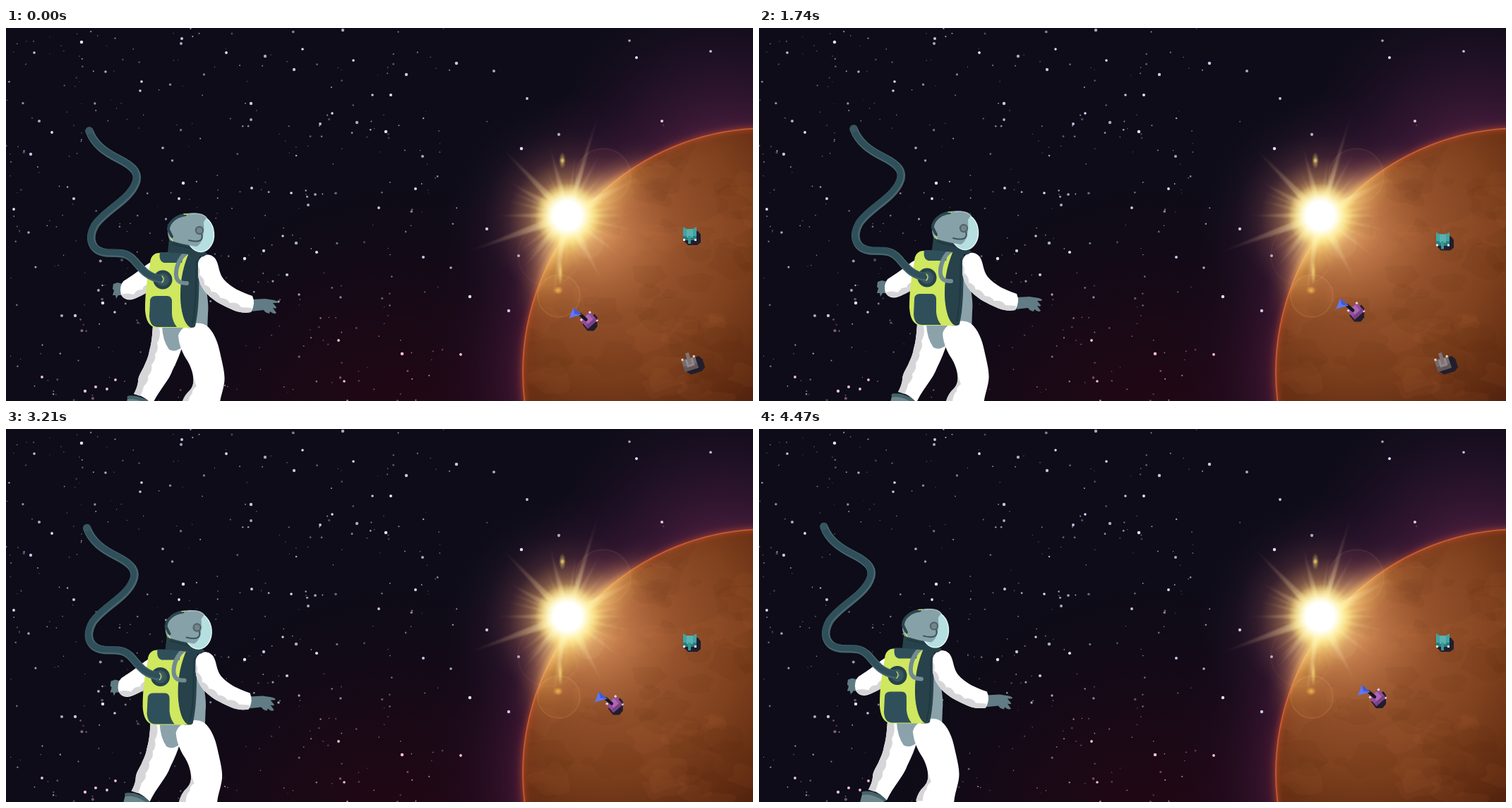
An HTML page with a canvas that plays this animation: 1058x529 px, repeating every 4500 ms.

```html
<!DOCTYPE html>
<html lang="en">
<head>
<meta charset="utf-8">
<title>Astronaut in orbit</title>
<style>
html, body { margin: 0; width: 100%; height: 100%; overflow: hidden; background: #0d0c18; }
canvas { display: block; width: 100%; height: 100%; }
</style>
</head>
<body>
<canvas id="stage" width="1058" height="529"></canvas>
<script>
const W = 1058, H = 529, LOOP = 4500, TAU = Math.PI * 2;
const stage = document.getElementById('stage').getContext('2d');
const backdrop = document.createElement('canvas');
backdrop.width = W;
backdrop.height = H;
let g = backdrop.getContext('2d');

const SUN = { x: 795, y: 266 };
const PLANET = { x: 1078, y: 488, r: 346 };

// Bright stars, x and y in turn
const STARS = [
  312,35, 249,15, 248,22, 192,76, 190,89, 141,62, 107,20, 40,35, 47,132, 538,147,
  347,107, 347,130, 492,46, 567,66, 590,182, 580,228, 591,325, 630,340, 644,463, 638,50,
  691,61, 893,42, 998,33, 883,18, 929,132, 738,100, 783,151, 730,171, 681,285, 726,323,
  657,381, 712,401, 438,236, 404,234, 348,227, 428,251, 245,242, 96,242, 32,290, 11,257,
  398,350, 386,388, 338,327, 365,316, 131,372, 137,390, 154,403, 51,495, 112,515, 127,509,
  143,512, 155,499, 98,408, 79,408, 471,443, 561,462, 479,501, 545,95, 519,95, 497,134,
  462,121, 445,136, 477,3, 420,30, 408,59, 367,40, 65,148, 35,179, 222,170, 251,220,
  392,295, 411,305, 440,318, 528,255
];

function seeded(seed) {
  return () => {
    seed = (seed * 1664525 + 1013904223) >>> 0;
    return seed / 4294967296;
  };
}

const clamp = v => Math.max(0, Math.min(1, v));

function fill(d, color) {
  g.fillStyle = color;
  g.fill(new Path2D(d));
}

function line(d, color, width) {
  g.strokeStyle = color;
  g.lineWidth = width;
  g.lineCap = g.lineJoin = 'round';
  g.stroke(new Path2D(d));
}

function disc(x, y, r, color) {
  g.fillStyle = color;
  g.beginPath();
  g.arc(x, y, r, 0, TAU);
  g.fill();
}

function ring(x, y, r, color, width) {
  g.strokeStyle = color;
  g.lineWidth = width;
  g.beginPath();
  g.arc(x, y, r, 0, TAU);
  g.stroke();
}

// Stops are position and colour in turn
function radial(x, y, r0, r1, ...stops) {
  const grad = g.createRadialGradient(x, y, r0, x, y, r1);
  for (let i = 0; i < stops.length; i += 2) grad.addColorStop(stops[i], stops[i + 1]);
  return grad;
}

function glow(...args) {
  g.fillStyle = radial(...args);
  g.fillRect(0, 0, W, H);
}

function drawSky() {
  g.fillStyle = '#0d0c18';
  g.fillRect(0, 0, W, H);
  glow(560, 610, 0, 400, 0, 'rgba(56,3,18,.62)', .5, 'rgba(44,4,18,.4)', 1, 'rgba(30,4,18,0)');
  glow(PLANET.x, PLANET.y, 340, 490, 0, 'rgba(100,36,62,.7)', .2, 'rgba(72,26,60,.5)',
    .55, 'rgba(46,17,45,.28)', 1, 'rgba(30,12,32,0)');
  glow(1000, 160, 0, 250, 0, 'rgba(78,32,66,.55)', .45, 'rgba(60,25,58,.35)', 1, 'rgba(30,12,32,0)');
  glow(SUN.x, SUN.y, 0, 175, 0, 'rgba(110,66,66,.55)', .5, 'rgba(70,38,62,.32)', 1, 'rgba(40,18,45,0)');
}

function drawStars() {
  const rnd = seeded(71);
  for (let i = 0; i < 380; i++) {
    const x = rnd() * (i % 9 ? 620 : W), y = rnd() * H;
    const r = .6 + rnd() * rnd() * 1.5;
    const tint = y > 400 ? '225,165,190' : '200,196,228';
    disc(x, y, r, `rgba(${tint},${.25 + rnd() * .6})`);
  }
  for (let i = 0; i < STARS.length; i += 2) {
    const x = STARS[i], y = STARS[i + 1];
    const color = y > 430 || x === 929 ? '#f3bed0' : ['#e3dfff', '#c9c4ea', '#aaa8be'][i / 2 % 3];
    disc(x, y, 1.7 + rnd() * .6, color);
  }
}

function blotch(x, y, size, color, rnd) {
  const n = 13, pts = [];
  for (let i = 0; i < n; i++) {
    const a = i / n * TAU, r = size * (.5 + rnd() * .7);
    pts.push([x + Math.cos(a) * r * 1.3, y + Math.sin(a) * r * .8]);
  }
  g.fillStyle = color;
  g.beginPath();
  for (let i = 0; i <= n; i++) {
    const [ax, ay] = pts[i % n], [bx, by] = pts[(i + 1) % n];
    g.quadraticCurveTo(ax, ay, (ax + bx) / 2, (ay + by) / 2);
  }
  g.fill();
}

function drawPlanet() {
  const { x, y, r } = PLANET, rnd = seeded(19);
  g.save();
  g.beginPath();
  g.arc(x, y, r, 0, TAU);
  g.shadowColor = '#b84a2c';
  g.shadowBlur = 12;
  g.fillStyle = '#7c3f1c';
  g.fill();
  g.shadowBlur = 0;
  g.clip();
  glow(850, 290, 0, 350, 0, '#b0653d', .3, '#94512b', .55, '#7f411e', .8, '#602b11', 1, '#43190c');
  for (let i = 0; i < 85; i++) {
    const color = i % 3 ? 'rgba(72,28,10,.07)' : 'rgba(205,130,85,.055)';
    blotch(735 + rnd() * 330, 150 + rnd() * 380, 8 + rnd() * 28, color, rnd);
  }
  glow(x, y, r - 30, r, 0, 'rgba(110,38,20,0)', .7, 'rgba(125,45,22,.15)', 1, 'rgba(195,75,35,.45)');
  g.restore();
  ring(x, y, r, 'rgba(222,104,58,.7)', 1.8);
}

function ray(angle, length, width, alpha) {
  g.save();
  g.translate(SUN.x, SUN.y);
  g.rotate(angle * Math.PI / 180);
  const grad = g.createLinearGradient(0, 0, length, 0);
  grad.addColorStop(0, `rgba(255,235,150,${alpha})`);
  grad.addColorStop(.5, `rgba(245,205,130,${alpha * .45})`);
  grad.addColorStop(1, 'rgba(220,170,140,0)');
  g.fillStyle = grad;
  g.beginPath();
  g.moveTo(0, -width);
  g.lineTo(length, 0);
  g.lineTo(0, width);
  g.fill();
  g.restore();
}

function flare(x, y, rx, ry, color, alpha = .8) {
  g.save();
  g.translate(x, y);
  g.scale(rx, ry);
  g.fillStyle = radial(0, 0, 0, 1, 0, `rgba(${color},${alpha})`, 1, `rgba(${color},0)`);
  g.fillRect(-1, -1, 2, 2);
  g.restore();
}

// Sunlight spilling along the rim of the planet
function drawLimbLight() {
  const light = (color, reach) => radial(SUN.x, SUN.y, 0, reach,
    0, `rgba(${color},.85)`, .45, `rgba(${color},.5)`, 1, `rgba(${color},0)`);
  g.save();
  g.filter = 'blur(11px)';
  ring(PLANET.x, PLANET.y, PLANET.r - 4, light('235,150,50', 150), 42);
  g.filter = 'blur(4px)';
  ring(PLANET.x, PLANET.y, PLANET.r, light('255,190,80', 125), 9);
  g.restore();
}

function drawSun() {
  const rnd = seeded(8);
  g.save();
  g.globalCompositeOperation = 'screen';
  drawLimbLight();
  flare(826, 296, 125, 115, '205,125,65', .35);
  glow(SUN.x, SUN.y, 0, 120, 0, 'rgba(255,225,95,.95)', .28, 'rgba(255,205,75,.75)',
    .45, 'rgba(225,155,65,.36)', .7, 'rgba(150,85,50,.13)', 1, 'rgba(100,50,40,0)');
  const rays = [[-73, 152, 5], [-134, 136, 6], [160, 152, 7], [180, 104, 5], [0, 92, 5], [-28, 115, 8],
    [-150, 98, 6], [-104, 105, 5], [100, 125, 6], [62, 110, 6], [130, 100, 6]];
  g.filter = 'blur(1.2px)';
  for (const [angle, length, width] of rays) ray(angle, length, width, .55);
  for (let i = 0; i < 34; i++) ray(i * 10.6 + rnd() * 7, 55 + rnd() * 52, 4, .38);
  g.filter = 'none';
  flare(788, 188, 5, 12, '190,180,60');
  flare(788, 188, 4, 4, '255,150,50');
  flare(785, 346, 4, 18, '220,190,70');
  flare(782, 372, 7, 6, '255,165,40');
  disc(783, 380, 30, 'rgba(190,100,35,.07)');
  ring(783, 380, 30, 'rgba(240,150,80,.12)', 2);
  disc(846, 210, 39, 'rgba(140,70,55,.08)');
  ring(846, 210, 39, 'rgba(210,130,90,.09)', 2);
  ring(768, 322, 43, 'rgba(230,120,90,.05)', 2);
  disc(825, 305, 22, 'rgba(210,150,140,.08)');
  g.restore();
  glow(SUN.x, SUN.y, 0, 46, 0, '#fff', .44, '#fff', .6, 'rgba(255,250,205,.85)', 1, 'rgba(255,225,110,0)');
}

function drawHose() {
  const d = 'M118 146C125 165 140 176 160 186C182 197 190 207 183 222C173 245 140 259 126 280' +
    'C115 300 122 317 143 319C164 319 172 319 182 330C193 343 201 354 220 356';
  line(d, '#48656d', 11.5);
  g.save();
  g.translate(-1, -1);
  line(d, '#2f505a', 8.5);
  g.restore();
  disc(118, 146, 5, '#38565f');
}

function drawLegs() {
  fill('M172 526Q178 519 204 531L201 545H167Z', '#6d868d');
  line('M174 524Q187 522 204 533', '#45626a', 5);
  const outer = 'M208 422C207 438 206 448 203 458C202 466 198 474 195 481C191 489 187 494 187 502Q186 510 181 519';
  fill(outer + 'C190 520 200 526 207 534C217 513 231 500 236 485C242 473 247 461 250 450V424Z', '#fff');
  fill(outer + 'L190 522Q194 514 195 508Q203 501 201 494Q208 486 206 478Q213 470 211 463' +
    'Q217 455 214 447Q220 437 217 425Z', '#d6d6d9');
  fill('M266 344L280 348C283 368 288 390 286 405L285 432L250 452Q240 461 231 456Q222 444 221 423Z', '#8ba2aa');
  fill('M244 436C249 420 271 414 284 422C294 430 300 445 303 460C307 478 311 492 309 504' +
    'C307 517 303 524 302 540H248C251 526 260 516 264 509C268 497 263 482 257 472C251 463 245 451 244 436Z', '#fff');
  fill('M265 490Q268 505 260 514Q251 522 248 535H258Q258 524 264 518Q263 513 270 508Q267 502 265 490Z', '#d6d6d9');
}

function drawLeftArm() {
  fill('M166 363L158 361L152 363L151 370L153 372L151 379L155 379L156 384L159 379L166 379Z', '#617b83');
  fill('M205 332C191 341 181 350 171 356Q162 360 162 372Q162 382 171 385C184 388 192 376 204 372Z', '#fff');
  fill('M203 363Q195 364 193 371Q185 370 181 378Q171 375 163 378Q167 387 180 384Q190 382 203 373Z', '#d6d6d9');
}

function drawPack() {
  fill('M250 318L275 319C272 345 276 390 268 423Q266 426 256 425Q238 380 250 318Z', '#27424b');
  line('M270 330C268 355 271 390 264 419', '#203840', 2);
  fill('M204 335C204 325 209 319 217 319H259C252 336 247 354 247 379C247 400 252 421 262 425H213' +
    'C203 424 198 415 197 400C197 375 200 355 204 335Z', '#cfe85f');
  fill('M218 318H255Q250 325 249 333H224Q216 331 218 318Z', '#2f505a');
  fill('M204 388Q204 380 212 380H228Q235 380 235 388V406Q236 417 242 424H215Q204 424 203 409Z', '#2f505a');
  line('M261 317C249 319 242 335 241 346C240 358 245 362 256 362', '#718b91', 6);
  line('M258 316L261 320', '#cfe85f', 2);
  disc(222, 357, 13.5, '#27424b');
  disc(222, 357, 9, '#38565f');
}

function drawRightArm() {
  fill('M349 385L367 384L380 386Q387 388 384 390L378 390L383 396Q384 399 378 397L383 404Q380 407 374 402' +
    'L373 405Q367 404 365 400L346 402Z', '#617c84');
  fill('M272 334C274 321 289 317 297 328C302 336 301 347 308 356C318 368 334 375 349 380' +
    'Q354 391 347 403C331 406 319 399 307 393C289 384 274 370 272 350Z', '#fff');
  fill('M272 338Q276 343 274 350Q282 356 281 364Q289 366 291 374Q299 373 304 383Q313 383 317 390' +
    'Q328 388 333 396L348 397L347 403C331 406 319 399 307 393C289 384 274 370 272 350Z', '#d6d6d9');
}

function drawHelmet() {
  fill('M231 300L270 308L285 320Q278 328 270 322L229 318Z', '#27424b');
  line('M236 306L267 314', '#203840', 2);
  g.fillStyle = '#b5dfe0';
  g.strokeStyle = '#e3f5f3';
  g.lineWidth = 1.5;
  g.beginPath();
  g.ellipse(275, 292, 19.5, 25.5, -.08, 0, TAU);
  g.fill();
  g.stroke();
  fill('M232 301C224 285 233 265 256 263Q274 260 284 269L280 275C281 292 279 305 270 310Q249 307 232 301Z', '#87a1a9');
  line('M261 264Q277 261 284 269', '#a9bec3', 1.5);
  line('M254 265C242 266 230 275 230 286L235 296', '#2c4750', 4);
  line('M233 297L236 302M252 264L257 264', '#cfe85f', 1.3);
  line('M277 292C280 301 274 305 259 301', '#3b555e', 2);
  disc(274, 287, 6.2, '#50656c');
  disc(274, 287, 4, '#748488');
}

function drawAstronaut(t) {
  const dx = t < 2000 ? t * .0092 : 18.4 - (t - 2000) * .018;
  g.save();
  g.translate(dx, -t * .0017);
  drawLeftArm();
  drawLegs();
  drawPack();
  drawRightArm();
  drawHelmet();
  drawHose();
  line('M221 352Q225 356 221 361', '#cfe85f', 1.2);
  g.restore();
}

function drawTealTank(t) {
  g.save();
  g.translate(968, 291 + Math.min(t * .0043, 8));
  fill('M-7-3H12L16 2V13L11 17H-2L-8 11Z', '#221e2c');
  fill('M-9-9L-4-6H5L10-9V10H-9Z', '#43a3a1');
  fill('M-9 4H10V10H-9Z', '#2b7c7e');
  fill('M-4-6H5V6H-4Z', '#56b3af');
  fill('M-2 4H2V15H-2Z', '#3d9795');
  fill('M-9 8H-6V11H-9ZM7 8H10V11H7Z', '#dce9e8');
  g.restore();
}

function drawGreyTank() {
  g.save();
  g.translate(969, 474);
  g.rotate(-.3);
  fill('M-6-3L14-5L18 1V13L12 17H-4L-9 11Z', '#221e2c');
  fill('M-11-6H9V11H-11Z', '#776b6d');
  fill('M-11 4H9V11H-11Z', '#625759');
  fill('M-6-5H5V6H-6Z', '#93878a');
  fill('M-3-14H2V3H-3Z', '#807476');
  fill('M-11-8H-8V-5H-11ZM6-8H9V-5H6Z', '#ddd5d3');
  g.restore();
}

function drawPurpleTank(t) {
  g.save();
  g.translate(825.5 + t * .0113, 414.5 - t * .0075);
  fill('M-9 6L8-9L12-4V9L7 15H-2Z', '#211d2d');
  g.save();
  g.rotate(-.72);
  fill('M-9-8H9V8H-9Z', '#944f9d');
  fill('M-9 3H9V8H-9Z', '#7a4187');
  fill('M-4-7H5V3H-4Z', '#ad68b3');
  fill('M7-9H10V-6H7ZM-9-9H-6V-6H-9ZM7 7H10V9H7Z', '#e6d8e6');
  g.restore();
  line('M-4-1L-12-8', '#171420', 4.5);
  fill('M-28-3L-22-18L-10-8Z', '#6078ee');
  fill('M-22-18L-10-8L-20-9Z', '#4658cf');
  g.restore();
}

function drawShot(t) {
  const y = 312 + (t - 2200) * .495;
  if (t >= 2200 && y < 466) disc(968.5, y, 2.2, '#f0a044');
}

function drawBlast(t) {
  if (t < 2510 || t > 3200) return;
  const rnd = seeded(33), grow = 1 - (1 - clamp((t - 2510) / 280)) ** 2;
  g.save();
  g.globalAlpha = 1 - clamp((t - 2920) / 280);
  g.translate(968, 466);
  g.scale(grow, grow);
  g.strokeStyle = '#dc6240';
  g.lineCap = 'round';
  for (let i = 0; i < 28; i++) {
    const a = (i + rnd() * .6) / 28 * TAU, r = 27 + rnd() * 6.5, bend = (rnd() - .5) * .25;
    g.lineWidth = 2.2 + rnd() * 1.6;
    g.beginPath();
    g.moveTo(Math.cos(a) * 16, Math.sin(a) * 16);
    g.lineTo(Math.cos(a + bend) * r, Math.sin(a + bend) * r * .93);
    g.stroke();
  }
  disc(0, 0, 22.5, '#dc6240');
  fill('M-12-4L-7-8L-2-6L4-10L7-6L14-5L10 0L12 5L5 6L1 10L-3 6L-9 9L-8 3Z', '#dfaa49');
  g.restore();
}

function frame(now) {
  const t = now % LOOP;
  g.drawImage(backdrop, 0, 0);
  drawTealTank(t);
  drawPurpleTank(t);
  if (t < 2600) drawGreyTank();
  drawShot(t);
  drawBlast(t);
  drawAstronaut(t);
}

drawSky();
drawStars();
drawPlanet();
drawSun();
g = stage;
frame(0);

let start;
function tick(now) {
  start ??= now;
  frame(now - start);
  requestAnimationFrame(tick);
}
requestAnimationFrame(tick);
</script>
</body>
</html>
```
